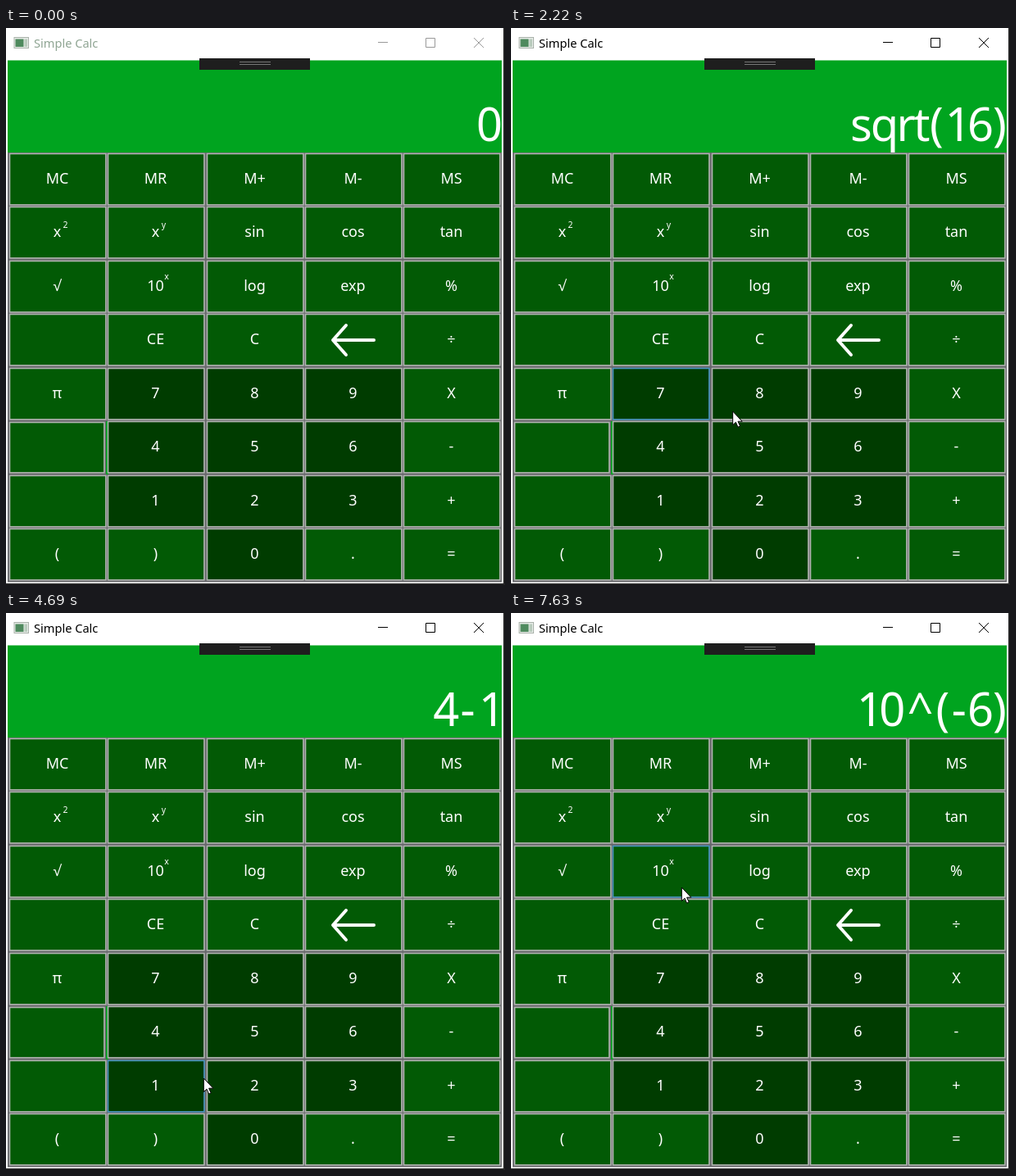
An HTML page that plays this animation: 609 by 680 pixels, repeating every 8 s.

```html
<!DOCTYPE html>
<html lang="en">
<head>
<meta charset="utf-8">
<title>Simple Calc</title>
<style>
  html, body { margin: 0; width: 100%; height: 100%; overflow: hidden; background: #fff; }
  svg { display: block; width: 609px; height: 680px; }
  text { font-family: "Noto Sans", "Open Sans", "DejaVu Sans", sans-serif; }
  .label { font-size: 18px; fill: #fff; text-anchor: middle; }
  .sup { font-size: 10.5px; }
  #display { font-size: 56px; fill: #fff; text-anchor: middle; }
</style>
</head>
<body>
<svg id="stage" viewBox="0 0 609 680" xmlns="http://www.w3.org/2000/svg">
  <rect width="609" height="680" fill="#fff"/>
  <rect x="607" width="2" height="680" fill="#252526"/>
  <rect y="678" width="609" height="2" fill="#252526"/>
  <g id="caption">
    <rect x="10" y="11.5" width="17.5" height="13" fill="#e8ece8" stroke="#a9b2aa"/>
    <rect x="11.5" y="13.5" width="10" height="9.5" fill="#4f8a5e"/>
    <rect x="22.5" y="13.5" width="3.5" height="9.5" fill="#b9cbbd"/>
    <text id="title" x="34" y="24" font-size="14.6">Simple Calc</text>
    <path id="controls" d="M454 17.5H466M512.5 12.5H523.5V23.5H512.5ZM571 12L583 24M583 12L571 24" fill="none"/>
  </g>
  <rect x="2" y="39.5" width="603" height="113" fill="#00a41f"/>
  <rect x="236" y="37" width="135" height="14" fill="#1e1e1e"/>
  <path d="M285 41.5H323M285 44.5H323" stroke="#777"/>
  <text id="display" y="138"></text>
  <rect x="2" y="152" width="603" height="524.5" fill="#66666a"/>
  <g id="keys"></g>
  <path d="M415 363L399 381L415 399M400 381H449" fill="none" stroke="#fff" stroke-width="4"
        stroke-linecap="round" stroke-linejoin="round"/>
  <g id="pointer">
    <path d="M.3 0V16.6L4 13.2L6.6 19.2L9.2 18L6.6 12.2H11.8Z" fill="#fff" stroke="#000" stroke-width="1"/>
    <circle id="press" cx="-1" cy="-.5" r="15" fill="#ff0" fill-opacity=".5"/>
  </g>
</svg>
<script>
const LOOP = 8000;
const $ = id => document.getElementById(id);

function add(parent, tag, attrs, content = "") {
  const el = document.createElementNS("http://www.w3.org/2000/svg", tag);
  for (const k in attrs) el.setAttribute(k, attrs[k]);
  el.textContent = content;
  parent.appendChild(el);
  return el;
}

const ROWS = [
  "MC MR M+ M- MS", "x^2 x^y sin cos tan", "√ 10^x log exp %", "_ CE C _ ÷",
  "π 7 8 9 X", "_ 4 5 6 -", "_ 1 2 3 +", "( ) 0 . ="
].map(r => r.split(" "));

const keys = [];
ROWS.forEach((row, r) => row.forEach((name, c) => {
  const x = Math.round(3.9 + 120.35 * c), y = Math.round(152.8 + 65.5 * r);
  const short = r === 5 && c === 0 ? 2 : 0;
  const g = $("keys");
  if (short) add(g, "rect", { x: 122, y: 480, width: 3, height: 65, fill: "#00a41f" });
  const box = add(g, "rect", {
    x: x + 0.5, y: y + 0.5 + short / 2, width: 117.4 - short, height: 62.4 - short / 2,
    fill: /^\d$/.test(name) ? "#003c00" : "#025a05", "stroke-width": 1.6
  });
  keys.push({ x, y, box });
  if (name === "_") return;
  const [base, sup] = name.split("^");
  add(g, "text", { x: x + 58.5, y: y + 36.5, class: "label" }, base);
  if (sup) add(g, "text", {
    x: x + (base === "x" ? 68.5 : 72), y: y + (base === "x" ? 26 : 22.5), class: "label sup"
  }, sup);
}));

// Display contents by start time
const READOUT = [
  [0, "0"], [600, "1"], [1210, "16"], [1900, "sqrt(16)"], [2760, "4"], [3930, "4-"],
  [4530, "4-1"], [5170, "4-10"], [5690, "-6"], [7560, "10^(-6)"]
];
// Mouse button held: from, to
const PRESSES = [
  [430, 600], [1060, 1210], [1750, 1900], [2680, 2830], [3780, 3930],
  [4380, 4530], [5020, 5170], [5540, 5850], [7500, 7630]
];
// Pointer stops: time, x, y
const PATH = [
  [130, 120, 690], [400, 190, 585], [600, 190, 585], [910, 403, 528], [1210, 403, 528],
  [1680, 54, 320], [1900, 54, 320], [2600, 548, 658], [3550, 548, 658], [3780, 530, 515],
  [3930, 530, 515], [4300, 205, 570], [4560, 205, 570], [4690, 241, 568], [4840, 285, 640],
  [5170, 285, 640], [5310, 593, 640], [6709, 593, 640], [6710, 514, 577],
  [7260, 208, 335], [LOOP, 208, 335]
];
const ENTER = PATH[0][0], ACTIVATE = PRESSES[0][0], HOVER_LAG = 75;

function pointerAt(t) {
  const i = PATH.findIndex(p => p[0] > t);
  if (i < 1) return [PATH[0][1], PATH[0][2]];
  const [t0, x0, y0] = PATH[i - 1], [t1, x1, y1] = PATH[i];
  const u = (t - t0) / (t1 - t0), e = u * u * (3 - 2 * u);
  return [x0 + (x1 - x0) * e, y0 + (y1 - y0) * e];
}

// Character cell widths in em; digits use the default
const CELL = { "-": 0.4, "^": 0.684, "(": 0.302, ")": 0.302, s: 0.424, q: 0.588, r: 0.348, t: 0.339 };
let shown = null;
function setDisplay(str) {
  if (str === shown) return;
  shown = str;
  const widths = [...str].map(ch => 56 * (CELL[ch] || 0.539));
  let x = 605 - widths.reduce((a, b) => a + b, 0);
  const xs = widths.map((w, i) => {
    x += w;
    return (x - w / 2 + (str[i] === "1" ? 3 : 0)).toFixed(1);
  });
  $("display").setAttribute("x", xs.join(" "));
  $("display").textContent = str;
}

function draw(t) {
  const active = t >= ACTIVATE;
  $("title").setAttribute("fill", active ? "#000" : "#8fa593");
  $("controls").setAttribute("stroke", active ? "#000" : "#999");
  setDisplay(READOUT.filter(r => r[0] <= t).pop()[1]);

  const [hx, hy] = pointerAt(t - HOVER_LAG);
  for (const { x, y, box } of keys) {
    const over = t > ENTER && hx >= x - 1 && hx < x + 119.4 && hy >= y - 1 && hy < y + 64.5;
    box.setAttribute("stroke", over ? "#4795c0" : "#b0b4b0");
  }

  const [px, py] = pointerAt(t);
  $("pointer").setAttribute("transform", `translate(${px.toFixed(2)} ${py.toFixed(2)})`);
  $("pointer").setAttribute("visibility", t >= ENTER ? "visible" : "hidden");
  const down = PRESSES.some(([a, b]) => t >= a && t < b);
  $("press").setAttribute("display", down ? "inline" : "none");
}

function tick() {
  draw(performance.now() % LOOP);
  requestAnimationFrame(tick);
}
tick();
</script>
</body>
</html>
```
